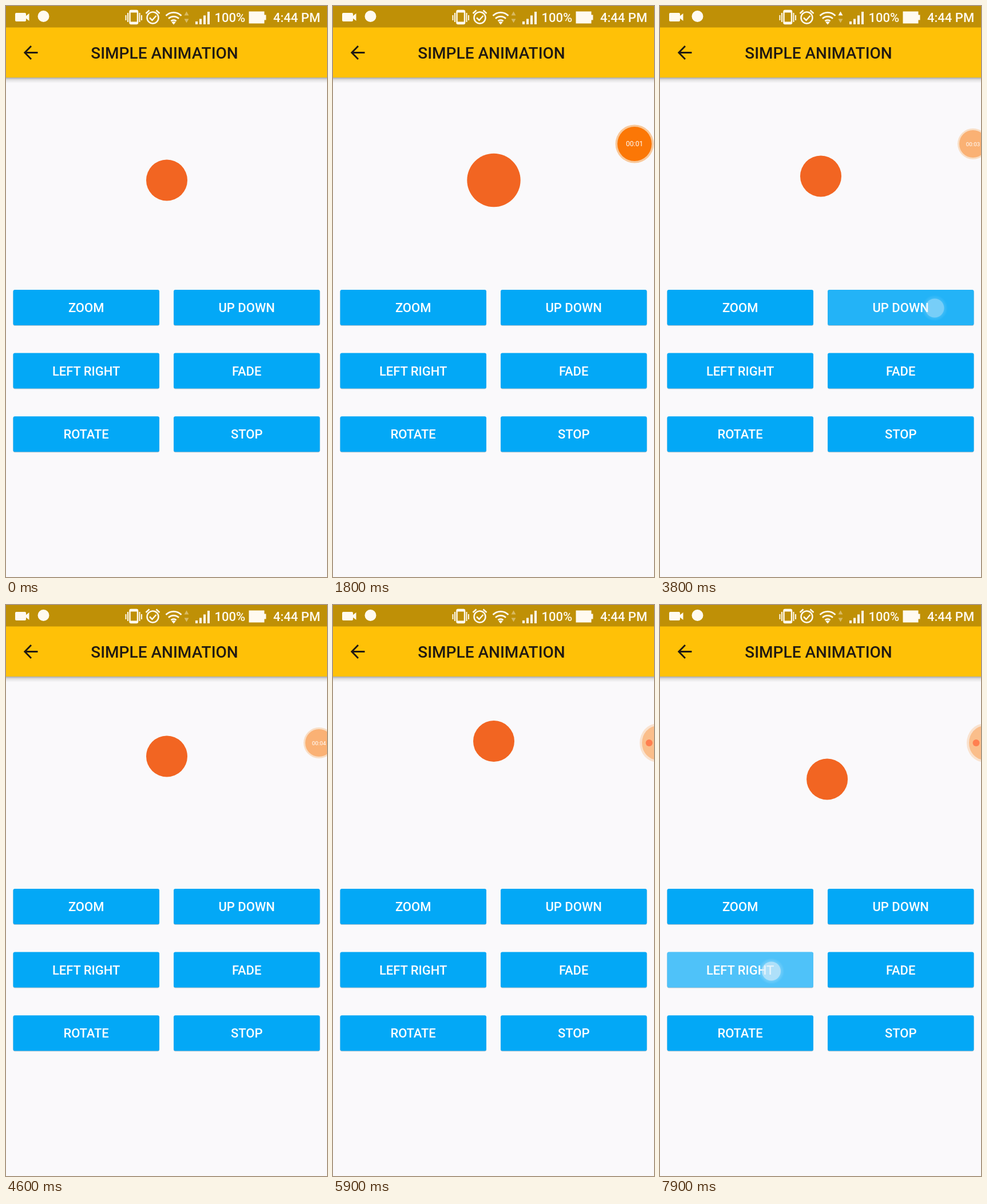
Recreate the animation shown at these times as an HTML page. Size 561 px wide and 998 px high, loop 8000 ms.

```html
<!DOCTYPE html>
<html lang="en">
<head>
<meta charset="utf-8">
<title>Simple animation</title>
<style>
  html, body { margin: 0; width: 100%; height: 100%; overflow: hidden; background: #faf9fb; }
  svg { display: block; width: 100vw; height: 100vh; }
  text { font-family: Roboto, "Noto Sans", sans-serif; font-weight: 500; }
</style>
</head>
<body>
<svg viewBox="0 0 561 998">
  <defs>
    <linearGradient id="shade" x2="0" y2="1">
      <stop offset="0" stop-color="#555" stop-opacity=".5"/>
      <stop offset=".4" stop-color="#777" stop-opacity=".2"/>
      <stop offset="1" stop-color="#888" stop-opacity="0"/>
    </linearGradient>
    <radialGradient id="glow">
      <stop offset=".65" stop-color="#fff" stop-opacity=".35"/>
      <stop offset="1" stop-color="#fff" stop-opacity="0"/>
    </radialGradient>
  </defs>

  <rect width="561" height="998" fill="#faf9fb"/>
  <rect y="125" width="561" height="10" fill="url(#shade)"/>
  <rect y="37" width="561" height="88" fill="#ffc107"/>
  <rect width="561" height="37.5" fill="#bf9006"/>

  <g id="status" fill="#fffaf0" stroke="#fffaf0" stroke-width="0">
    <rect x="16" y="12" width="19" height="15" rx="2"/>
    <path d="M34 18l6.500-5v13l-6.500-5z"/>
    <circle cx="65.500" cy="18" r="10"/>
    <g fill="none" stroke-width="2">
      <rect x="216.500" y="8" width="13.500" height="23" rx="2" stroke-width="2.500"/>
      <path d="M217 10h13M217 29h13" stroke-width="3"/>
      <path d="M209.500 16v9M213 12v16M233.500 12v16M237 16v9"/>
      <circle cx="256.500" cy="20.500" r="10" stroke-width="2.500"/>
      <path d="M251 20.500l4.500 4.500 7-8M244.500 13l6-5.500M268.500 13l-6-5.500" stroke-width="2.500"/>
      <path d="M279.500 17a19 19 0 0 1 27 0M284 22a13 13 0 0 1 18 0M288.500 26.500a6.500 6.500 0 0 1 9 0" stroke-width="2.800"/>
    </g>
    <path d="M289.500 28.500a5 5 0 0 1 7 0l-3.500 4z"/>
    <path id="up" d="M311.500 16.500l4-7 4 7z"/>
    <path d="M311.500 22.500l4 7 4-7z" opacity=".4"/>
    <path d="M331 27h4v5h-4zM338 22.500h4v9.500h-4zM345 16.500h4v15.500h-4zM352 10h4v22h-4z"/>
    <path d="M424.500 9.500h27v6h3v9h-3v6h-27z"/>
    <text x="364.500" y="28" font-size="22">100%</text>
    <text x="467" y="28" font-size="22">4:44 PM</text>
  </g>

  <path d="M55.500 81.500H33M44 70L32.800 81.500 44 93" fill="none" stroke="#211a12" stroke-width="2.900"/>
  <text x="277" y="91.500" font-size="28" text-anchor="middle" fill="#211a12">SIMPLE ANIMATION</text>

  <circle id="logo" r="36" fill="#f26522"/>
  <g id="buttons"></g>
  <g id="touch">
    <circle r="23" fill="url(#glow)"/>
    <circle r="16.500" fill="#d8eefa"/>
  </g>

  <g id="bubble">
    <ellipse id="ring" cy="241" fill="#f8c89a"/>
    <ellipse id="disc" cy="241" fill="#fb7706"/>
  </g>
  <text id="timer" text-anchor="middle" fill="#fff" style="font-weight:400"></text>
  <circle id="dot" cx="552.500" cy="241" r="6" fill="#ff7f50"/>
</svg>

<script>
const LOOP = 8000, STEP = 100;
const SVG = "http://www.w3.org/2000/svg";
const $ = id => document.getElementById(id);

function set(el, attrs) {
  for (const key in attrs) el.setAttribute(key, attrs[key]);
  return el;
}
function add(parent, tag, attrs) {
  return parent.appendChild(set(document.createElementNS(SVG, tag), attrs));
}
const clamp = v => Math.max(0, Math.min(1, v));
const ramp = (t, from, to) => clamp((t - from) / (to - from));
const mix = (a, b, k) => a + (b - a) * k;

const labels = ["ZOOM", "UP DOWN", "LEFT RIGHT", "FADE", "ROTATE", "STOP"];
const overlays = labels.map((label, i) => {
  const x = 12.5 + (i % 2) * 280.5, y = 496 + Math.floor(i / 2) * 110.6;
  const box = { x, y, width: 255.5, height: 62, rx: 3 };
  add($("buttons"), "rect", { ...box, y: y + 1, fill: "#b5c3cc" });
  add($("buttons"), "rect", { ...box, fill: "#03a8f6" });
  const overlay = add($("buttons"), "rect", { ...box, fill: "#fff", opacity: 0 });
  add($("buttons"), "text", {
    x: x + 127.7, y: y + 39, fill: "#fff", "font-size": 22, "text-anchor": "middle"
  }).textContent = label;
  return overlay;
});

const UP_START = 3630, SIDE_START = 7630;
const presses = [
  { button: 1, x: 480, y: 528, start: 3620, hold: 3720, end: 3930, tint: 0.2, alpha: 0.75 },
  { button: 2, x: 194.5, y: 640, start: 7620, hold: 7900, end: 8100, tint: 0.3, alpha: 0.7 }
];

// Linear back and forth: 0 → peak → 0 → -peak
function swing(elapsed, peak, leg) {
  const phase = (elapsed / leg) % 4;
  return peak * (phase < 1 ? phase : phase < 3 ? 2 - phase : phase - 4);
}

function drawLogo(t) {
  let x = 281, y = 304.5, scale = 1;
  if (t < UP_START) scale = 1 + swing(t, 0.51, 1270);
  else if (t < SIDE_START) y -= swing(t - UP_START, 80, 1940);
  else x += swing(t - SIDE_START, 80, 1940);
  set($("logo"), { transform: `translate(${x} ${y}) scale(${scale})` });
}

function drawPresses(t) {
  let shown = 0;
  for (const p of presses) {
    const level = ramp(t, p.start, p.start + 60) * (1 - ramp(t, p.hold, p.end));
    set(overlays[p.button], { opacity: p.tint * level });
    if (level > 0) {
      shown = p.alpha * level;
      set($("touch"), { transform: `translate(${p.x} ${p.y})` });
    }
  }
  set($("touch"), { opacity: shown });
}

function drawBubble(t) {
  const shrink = ramp(t, 2000, 2300), tuck = ramp(t, 5500, 5700);
  const cx = mix(mix(527, 547, shrink), 566, tuck);
  const rx = mix(mix(33.5, 27, shrink), 30, tuck);
  const ry = mix(mix(33.5, 27, shrink), 33.5, tuck);
  const rim = mix(3.5, 3, shrink) + tuck;
  const visible = ramp(t, 200, 500);
  set($("bubble"), { opacity: visible * mix(mix(1, 0.55, shrink), 0.45, tuck) });
  set($("ring"), { cx, rx, ry });
  set($("disc"), { cx, rx: rx - rim, ry: ry - rim });
  const size = mix(12, 9.8, shrink);
  set($("timer"), { x: cx, y: 241 + size * 0.36, "font-size": size, opacity: visible * (1 - tuck) });
  $("timer").textContent = "00:0" + Math.max(0, Math.floor((t - 400) / 1000));
  set($("dot"), { opacity: tuck });
}

function render(now) {
  const t = Math.floor((now % LOOP) / STEP) * STEP;
  drawLogo(t);
  drawPresses(t);
  drawBubble(t);
  set($("up"), { opacity: t >= 3600 && t < 4200 ? 1 : 0.4 });
}

let origin;
function tick(now) {
  origin ??= now;
  render(now - origin);
  requestAnimationFrame(tick);
}
render(0);
requestAnimationFrame(tick);
</script>
</body>
</html>
```
